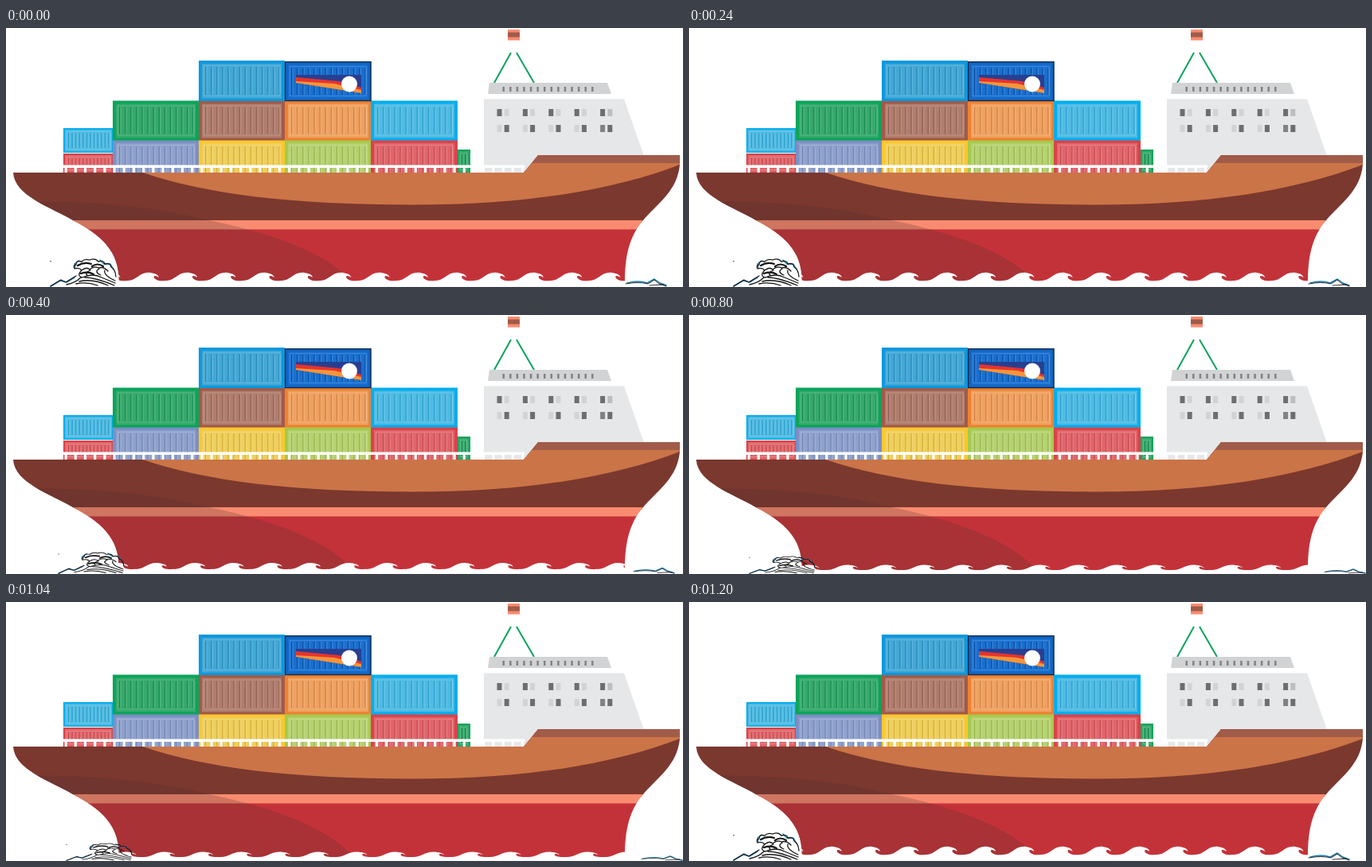
Animation, 850 px wide and 326 px high, one loop 1600 ms. Source, as an HTML page with a canvas:

```html
<!DOCTYPE html>
<html lang="en">
<head>
<meta charset="utf-8">
<title>Cargo ship</title>
<style>
html, body { margin: 0; width: 100%; height: 100%; overflow: hidden; background: #fff; }
canvas { display: block; }
</style>
</head>
<body>
<canvas id="stage" width="850" height="326"></canvas>
<script>
const ctx = document.getElementById('stage').getContext('2d');
const STEP = 400;
// Each pose pushes the water sideways and flattens it towards the bottom edge.
const POSES = [
  { shift: 0, height: 1 },
  { shift: 10, height: 0.77 },
  { shift: 20, height: 0.63 },
  { shift: 0, height: 1 }
];

function rect(color, x, y, w, h) {
  ctx.fillStyle = color;
  ctx.fillRect(x, y, w, h);
}

function shape(color, d) {
  ctx.fillStyle = color;
  ctx.fill(new Path2D(d));
}

function line(color, width, d) {
  ctx.strokeStyle = color;
  ctx.lineWidth = width;
  ctx.stroke(new Path2D(d));
}

function container(x, y, w, h, frame, panel, groove, border = 4) {
  rect(frame, x, y, w, h);
  rect(panel, x + border, y + border, w - 2 * border, h - border * 1.8);
  const inset = border + 4;
  const pitch = w > 80 ? 7.1 : 4.6;
  for (let gx = x + inset; gx < x + w - border; gx += pitch) {
    rect(groove, gx, y + inset, 1.3, h - 2 * inset);
    rect('rgba(255,255,255,.14)', gx + 1.3, y + inset, 1.5, h - 2 * inset);
  }
  ctx.strokeStyle = 'rgba(255,255,255,.18)';
  ctx.lineWidth = 1;
  ctx.strokeRect(x + border + 2.5, y + border + 2.5, w - 2 * border - 5, h - 2 * border - 5);
}

function drawContainers() {
  container(72, 126, 63, 31, '#00aeef', '#4fbbe3', '#2c9fcb', 2);
  container(72, 158, 63, 25, '#dc4148', '#e0666a', '#c74b50', 2);
  container(566, 153, 17, 30, '#0ba45a', '#35a96b', '#188b4c', 2);

  container(134, 141, 108, 50, '#7b8fc4', '#8fa1cc', '#7185b8');
  container(242, 141, 108, 50, '#fcc72e', '#efcf5b', '#d3ae37');
  container(350, 141, 109, 50, '#a5ca4d', '#b6d170', '#96b64e');
  container(458, 141, 109, 50, '#da434a', '#e0666b', '#c84b51');

  container(134, 91.5, 108, 50, '#0ba45a', '#35a96b', '#188b4c');
  container(242, 91.5, 108, 50, '#a05b49', '#b07d6e', '#94604f');
  container(350, 91.5, 109, 50, '#ef8131', '#efa160', '#d38142');
  container(458, 91.5, 109, 50, '#00aeef', '#4fbbe3', '#2c9fcb');

  container(242, 41, 108, 51, '#0b98dc', '#43a8d6', '#2489b8');
  container(350, 42, 108.5, 50, '#1262bd', '#176fd0', '#0c4ea0');
  ctx.strokeStyle = '#0a2342';
  ctx.lineWidth = 1.2;
  ctx.strokeRect(350.6, 42.6, 107.4, 49);
  shape('#283f91', 'M364 59L446 59V82L364 69Z');
  shape('#e8332e', 'M364 62L418 67L446 75V78L364 67Z');
  shape('#f5953b', 'M364 67L412 70L446 78V82L364 69Z');
  ctx.fillStyle = '#fff';
  ctx.beginPath();
  ctx.arc(431, 70.5, 10, 0, 7);
  ctx.fill();
}

function drawBridge() {
  line('#0ba45a', 2, 'M634 31L613 69M641 31L663 69');
  rect('#f98b70', 630, 2, 15, 13.5);
  rect('#a05b49', 630, 5.5, 15, 6);
  shape('#d1d3d4', 'M607 69H755L760 83H605Z');
  for (let i = 0; i < 14; i++) rect('#808285', 623.5 + i * 8.58, 74, 2.5, 6);
  shape('#e6e7e8', 'M600 89.5H776L801 161L650 183H600Z');
  for (let i = 0; i < 5; i++) {
    const x = 616.5 + i * 32.4;
    const last = i === 4;
    rect('#6d6e71', x, 102, 6, 9);
    rect(last ? '#bcbec0' : '#d1d3d4', x + 9.2, 102, 6, 9);
    rect(last ? '#808285' : '#d1d3d4', x, 122, 6, 9);
    rect('#6d6e71', x + 9.2, 122, 6, 9);
  }
}

function drawRailing() {
  rect('#fff', 71, 172.5, 580, 3.5);
  for (let x = 73.5; x < 652; x += 12.2) rect('#fff', x, 176, 3.2, 6.5);
}

function drawHull() {
  ctx.save();
  ctx.clip(new Path2D(`M9 182H650L668 160H846V172C843 205 818 221 800 242
    C782 263 777 288 777 321H142C142 288 130 266 84 242C56 225 11 212 9 182Z`));
  rect('#7b382e', 0, 155, 850, 90);
  shape('#cb7447', 'M172 182H650L668 160H846V172C760 205 650 222.5 510 222.5C360 222.5 250 209 172 182Z');
  shape('#a05b49', 'M668 160H846V170H660Z');
  rect('#f98b70', 0, 242, 850, 12);
  rect('#c43239', 0, 253.5, 850, 72);
  ctx.save();
  ctx.clip(new Path2D('M0 219C110 216 190 226 255 242C330 258 402 281 436 321H0Z'));
  rect('#6f352e', 0, 210, 450, 32);
  rect('#cf7560', 0, 242, 450, 12);
  rect('#a83236', 0, 253.5, 450, 72);
  ctx.restore();
  ctx.restore();
}

function drawWater({ shift, height }) {
  ctx.save();
  ctx.translate(shift, 326 * (1 - height));
  ctx.scale(1, height);

  const crest = 'c12 1 16 -12 30 -10c6 1 10 3 10 6c-2 -2 -6 -3 -6 -1c0 4 7 6 14.3 5';
  shape('#fff', 'M103.4 318' + crest.repeat(14) + 'V340H103.4Z');
  line('#f1f1f1', 0.7, 'M155 318V325.3H776');

  // Bow splash
  ctx.lineCap = ctx.lineJoin = 'round';
  line('#1b7fb0', 1.5, 'M56 325L68 318L76 320L86 314M87 301L86 297L91 293M118 292L123 297L131 297L135 304');
  line('#151515', 1.3, `M56 325L69 317L75 320L88 312
    M86 303Q84 298 88 298Q88 292 95 294Q99 290 105 292Q112 289 116 294
    Q123 292 124 297Q131 295 132 301Q137 303 138 313
    M86 303Q92 301 95 305Q101 300 105 304Q111 299 116 302Q123 300 128 306
    M95 305Q88 312 96 314Q109 308 120 314L137 321
    M94 314Q87 321 76 323M99 314Q112 314 136 324M92 319Q108 315 128 324
    M88 322Q101 319 115 324M106 305Q98 308 102 311M117 303Q110 307 119 311
    M124 305Q122 311 137 318`);
  line('#151515', 2.2, 'M90 299Q98 294 107 297M108 300Q115 295 122 300M94 309Q103 306 110 310');
  rect('#151515', 55.5, 293, 1.2, 1.2);

  // Stern wake
  line('#1b7fb0', 1.5, 'M780 321Q794 317 805 321L814 316L821 321L829 324');
  line('#151515', 0.9, 'M778 322Q794 319 806 322L814 317L820 322L829 325M808 324L826 323');
  ctx.restore();
}

function draw(now) {
  rect('#fff', 0, 0, 850, 326);
  drawContainers();
  drawBridge();
  drawRailing();
  drawHull();
  drawWater(POSES[Math.floor(now / STEP) % POSES.length]);
}

function tick() {
  draw(performance.now());
  requestAnimationFrame(tick);
}
tick();
</script>
</body>
</html>
```
